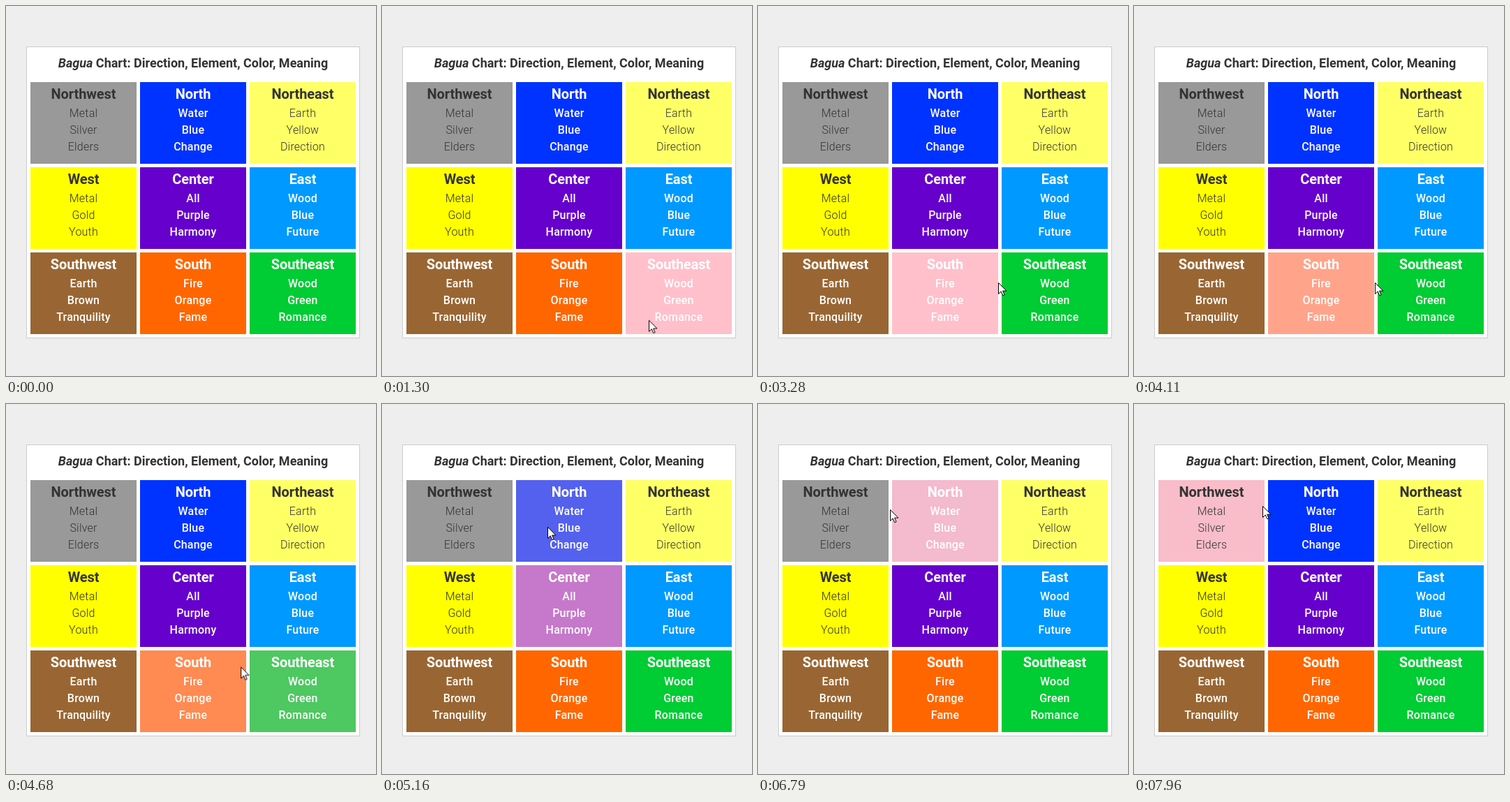
Animation of 530 by 530 pixels, one loop 8 s. Source, as an HTML page:

```html
<!DOCTYPE html>
<html lang="en">
<head>
<meta charset="utf-8">
<title>Bagua Chart</title>
<style>
  html, body { margin: 0; width: 100%; height: 100%; overflow: hidden; background: #eee; }
  body { position: relative; font: 16px/24px Roboto, sans-serif; color: #333; text-align: center; }
  #chart {
    position: absolute; left: 29px; top: 58px; width: 478px; height: 418px;
    box-sizing: border-box; border: 1px solid #ccc; background: #fff;
  }
  h1 {
    position: absolute; left: 0; right: 0; top: 11px; margin: 0;
    font: bold 18px/24px Roboto, sans-serif; white-space: nowrap;
  }
  #grid {
    position: absolute; left: 5px; top: 50px; display: grid; gap: 5px;
    grid-template: repeat(3, 117px) / repeat(3, 152px);
  }
  .cell { padding-top: 5px; box-sizing: border-box; letter-spacing: .2px; }
  .cell.light { color: #fff; }
  .cell.light div { font-weight: 500; }
  .cell:not(.light) div { font-weight: 300; }
  h2 { margin: 0 0 4px; font: bold 20px/24px Roboto, sans-serif; letter-spacing: -.1px; }
  #cursor { position: absolute; left: 0; top: 0; width: 13px; height: 20px; overflow: visible; }
</style>
</head>
<body>
<div id="chart">
  <h1><i>Bagua</i> Chart: Direction, Element, Color, Meaning</h1>
  <div id="grid"></div>
</div>
<svg id="cursor" viewBox="0 0 13 20">
  <path d="M.5.5v16l3.7-3.6 2.6 5.8 2.3-1-2.5-5.6h5.3z" fill="#fff" stroke="#000"/>
</svg>
<script>
const LOOP = 8000, FADE = 200, STEP = 2, PINK = '#ffc0cb';
const timing = { duration: LOOP, iterations: Infinity };

const cells = [
  ['Northwest', 'Metal Silver Elders', '#999'],
  ['North', 'Water Blue Change', '#03f', 'light'],
  ['Northeast', 'Earth Yellow Direction', '#ff6'],
  ['West', 'Metal Gold Youth', '#ff0'],
  ['Center', 'All Purple Harmony', '#60c', 'light'],
  ['East', 'Wood Blue Future', '#09f', 'light'],
  ['Southwest', 'Earth Brown Tranquility', '#963', 'light'],
  ['South', 'Fire Orange Fame', '#f60', 'light'],
  ['Southeast', 'Wood Green Romance', '#0c3', 'light'],
];

// The pointer rests at a stop, then glides evenly to the next one.
const stop = (x, y, from, until = from) => ({ x, y, from, until });
// Nudge one pixel from the gap onto the cell at its left, and back.
const brush = (from, until) => [
  stop(345, 396, from - 10), stop(344, 396, from, until), stop(345, 396, until + 10),
];
const stops = [
  stop(404, 501, 130), stop(404, 412, 430, 730), stop(393, 463, 1000, 1200),
  stop(344, 404, 1650), stop(338, 402, 1780), stop(344, 401, 1908),
  stop(349, 400, 2015), stop(353, 400, 2040, 2150), stop(345, 396, 2500),
  ...brush(2830, 3290), ...brush(3720, 4046),
  stop(345, 396, 4240), stop(350, 397, 4290, 4530),
  stop(344, 390, 4600), stop(320, 348, 4850), stop(258, 228, 5092),
  stop(237, 176, 5160), stop(224, 79, 5760, 6130), stop(215, 130, 6300),
  stop(195, 151, 6770), stop(189, 151, 6790), stop(187, 149, 6910),
  stop(184, 146, 7110, 7260), stop(188, 146, 7280, 7770), stop(184, 146, 7785, LOOP),
];

function pointerAt(time) {
  const next = stops.findIndex(s => s.until >= time);
  const b = stops[next], a = stops[next - 1];
  if (!a || time >= b.from) return b;
  const k = (time - a.until) / (b.from - a.until);
  return { x: a.x + (b.x - a.x) * k, y: a.y + (b.y - a.y) * k };
}

function isOver(index, { x, y }) {
  const dx = x - 35 - (index % 3) * 157, dy = y - 109 - Math.floor(index / 3) * 122;
  return dx >= 0 && dx <= 152 && dy >= 0 && dy <= 117;
}

// Every time the pointer enters or leaves a cell starts a fade.
function fadeFrames(index, color) {
  const frames = [{ offset: 0, backgroundColor: color }];
  const add = (time, backgroundColor) => {
    if (time <= LOOP) frames.push({ offset: time / LOOP, backgroundColor });
  };
  let over = false, current = color;
  for (let time = 0; time < LOOP; time += STEP) {
    if (isOver(index, pointerAt(time)) === over) continue;
    over = !over;
    add(time, current);
    current = over ? PINK : color;
    add(time + FADE, current);
  }
  add(LOOP, current);
  return frames;
}

const grid = document.getElementById('grid');
const animations = cells.map(([name, lines, color, tone = ''], index) => {
  const cell = document.createElement('div');
  cell.className = `cell ${tone}`;
  cell.innerHTML = `<h2>${name}</h2>` + lines.split(' ').map(line => `<div>${line}</div>`).join('');
  grid.append(cell);
  return cell.animate(fadeFrames(index, color), timing);
});

const cursor = document.getElementById('cursor');
const shown = stops[0].from / LOOP;
const pose = ({ x, y }, time) => ({ offset: time / LOOP, transform: `translate(${x}px, ${y}px)` });
animations.push(
  cursor.animate([
    pose(stops[0], 0), ...stops.flatMap(s => [pose(s, s.from), pose(s, s.until)]),
  ], timing),
  cursor.animate([
    { offset: 0, opacity: 0 }, { offset: shown, opacity: 0 },
    { offset: shown, opacity: 1 }, { offset: 1, opacity: 1 },
  ], timing),
);

const origin = document.timeline.currentTime ?? 0;
for (const animation of animations) animation.startTime = origin;
</script>
</body>
</html>
```
